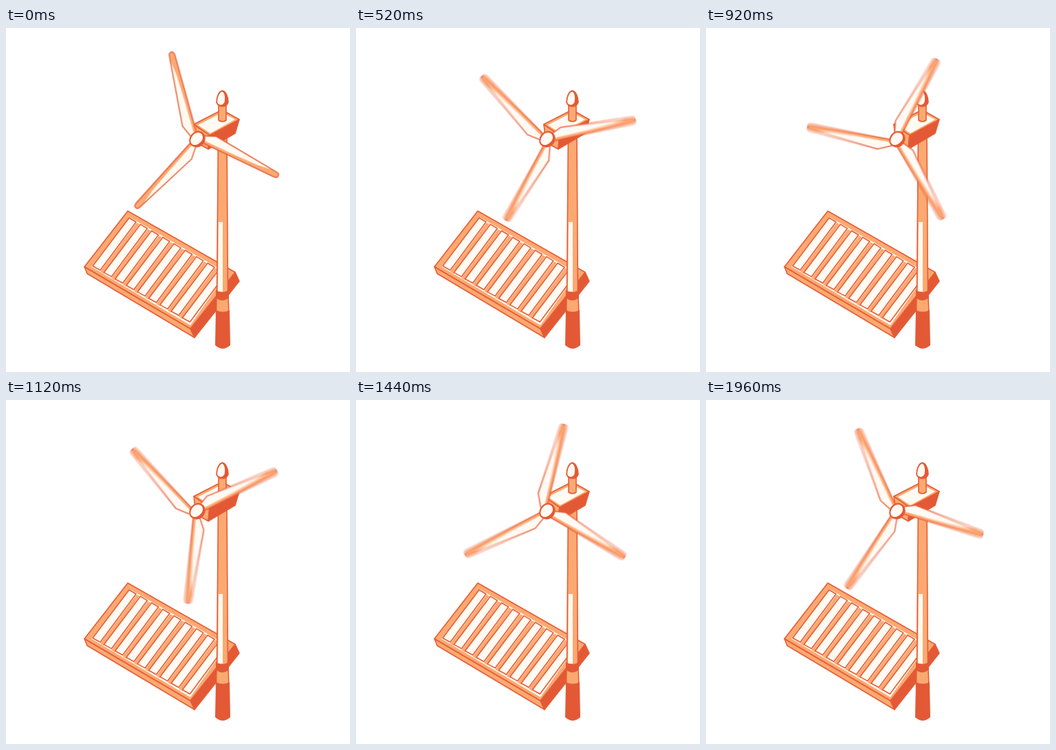
An HTML page that plays this animation: 500x500 px, repeating every 2000 ms.

```html
<!DOCTYPE html>
<html lang="en">
<head>
<meta charset="utf-8">
<title>Wind and solar</title>
<style>
  html, body { margin: 0; width: 100%; height: 100%; overflow: hidden; background: #fff; }
  svg { display: block; width: 100vw; height: 100vh; }
  .line { stroke: #e65c36; stroke-width: 1.6; stroke-linejoin: round; }
  .orange { fill: #fca971; }
  .dark { fill: #e35935; }
  .cream { fill: #fffaf2; }
  #rotor { isolation: isolate; }
  #rotor use { mix-blend-mode: plus-lighter; }
</style>
</head>
<body>
<svg viewBox="0 0 500 500">
  <defs>
    <g id="blade">
      <path class="cream" d="M3.5-6 4-128Q3.5-133 0-133T-4-129L-13.5-25-5-5Z"/>
      <path class="orange" d="M3-6 3.4-128Q3-132.3 0-132.3T-3.4-128L-4-119-1.5-98-.5-60-.5-6Z"/>
      <path class="line" fill="none" d="M3.5-6 4-128Q3.5-133 0-133T-4-129L-13.5-25-5-5"/>
    </g>
    <g id="blades">
      <use href="#blade"/>
      <use href="#blade" transform="rotate(129.3) translate(-4 0) rotate(1.8) scale(1 .98)"/>
      <use href="#blade" transform="rotate(237.6) scale(1 .99)"/>
    </g>
  </defs>

  <g id="panel">
    <path class="orange line" d="M114 347 268 437 274 450 118 357Z"/>
    <path class="dark line" d="M268 437 333 355 339 368 274 450Z"/>
    <path class="orange line" d="M177 266 333 355 268 437 114 347Z"/>
    <path class="cream" d="M180 275 321 356 268 432 124 347Z"/>
    <g id="slats"></g>
  </g>

  <g id="tower">
    <path class="orange line" d="M308.5 150H321L322.500 386H306.500Z"/>
    <path class="cream" d="M309 282H315V383H308Z"/>
    <path class="orange line" d="M306 390H323L324 415H305.500Z"/>
    <path class="dark" d="M305 381Q314 387 324 381V392Q314 400 305 392Z"/>
    <path class="dark" d="M305 410Q315 415 325 410L326 461Q315 471 304 461Z"/>
  </g>

  <g id="nacelle">
    <path class="orange line" d="M273 140 296 155 294 176 276 166Z"/>
    <path class="dark line" d="M296 155 339 133 333 153 294 176Z"/>
    <path class="orange line" d="M273 140 314 119 339 133 296 156Z"/>
    <path class="cream" d="M279 141 314 123 333 133 297 153Z"/>
    <path class="orange line" d="M309 111H320V134Q314.500 138 309 134Z"/>
    <path class="dark line" d="M314.500 91C320 92 323 101 323 108Q321 114 314.500 114T306 108C306 101 309 92 314.500 91Z"/>
    <path class="cream" d="M314 92.500C318 94 319 101 317.500 108Q315 112.500 311 111.500T307.200 107C307.500 100 310 94 314 92.500Z"/>
  </g>

  <g id="rotor" transform="translate(276.3 163)"></g>

  <g id="hub">
    <path class="dark line" d="M267 164C267 156 274 150 280 150.500 286 151 289 156 289 161 288 169 281 174 275 172.500 269 171 267 168 267 164Z"/>
    <path class="cream" d="M268.300 164C269 156 275 151.500 280 152 285 153 287 157 285.500 162 283 167 278 170.500 273 170 269 168.500 268.300 166 268.300 164Z"/>
  </g>
</svg>
<script>
  const svgNS = 'http://www.w3.org/2000/svg';
  const rotor = document.getElementById('rotor');
  const slats = document.getElementById('slats');
  const loop = 2000, step = 40, startAngle = -15.8;
  const copies = 5, blurAngle = 2.4;

  function add(parent, tag, attributes) {
    const node = document.createElementNS(svgNS, tag);
    for (const name in attributes) node.setAttribute(name, attributes[name]);
    parent.appendChild(node);
    return node;
  }

  for (let i = 0; i < 9; i++) {
    const group = add(slats, 'g', { transform: `translate(${16.3 * i} ${9.4 * i})` });
    if (i < 8) add(group, 'path', { class: 'orange', d: 'M190 283l4 2-52 72-5-3z' });
    add(group, 'path', { class: 'cream line', d: 'M179 276l10 6-52 70-11-6z' });
  }

  const layers = Array.from({ length: copies }, () => add(rotor, 'use', { href: '#blades' }));

  function render(time) {
    const t = Math.floor((time % loop) / step) * step;
    const angle = startAngle + 3 * Math.floor(t * 3 / 50);
    const blurred = t > 0;
    layers.forEach((layer, i) => {
      const offset = blurred ? (i / (copies - 1) - 0.5) * blurAngle : 0;
      layer.setAttribute('transform', `rotate(${angle + offset})`);
      layer.setAttribute('opacity', blurred ? 1 / copies : i ? 0 : 1);
    });
  }

  const start = performance.now();
  function tick() {
    render(performance.now() - start);
    requestAnimationFrame(tick);
  }
  render(0);
  requestAnimationFrame(tick);
</script>
</body>
</html>
```
